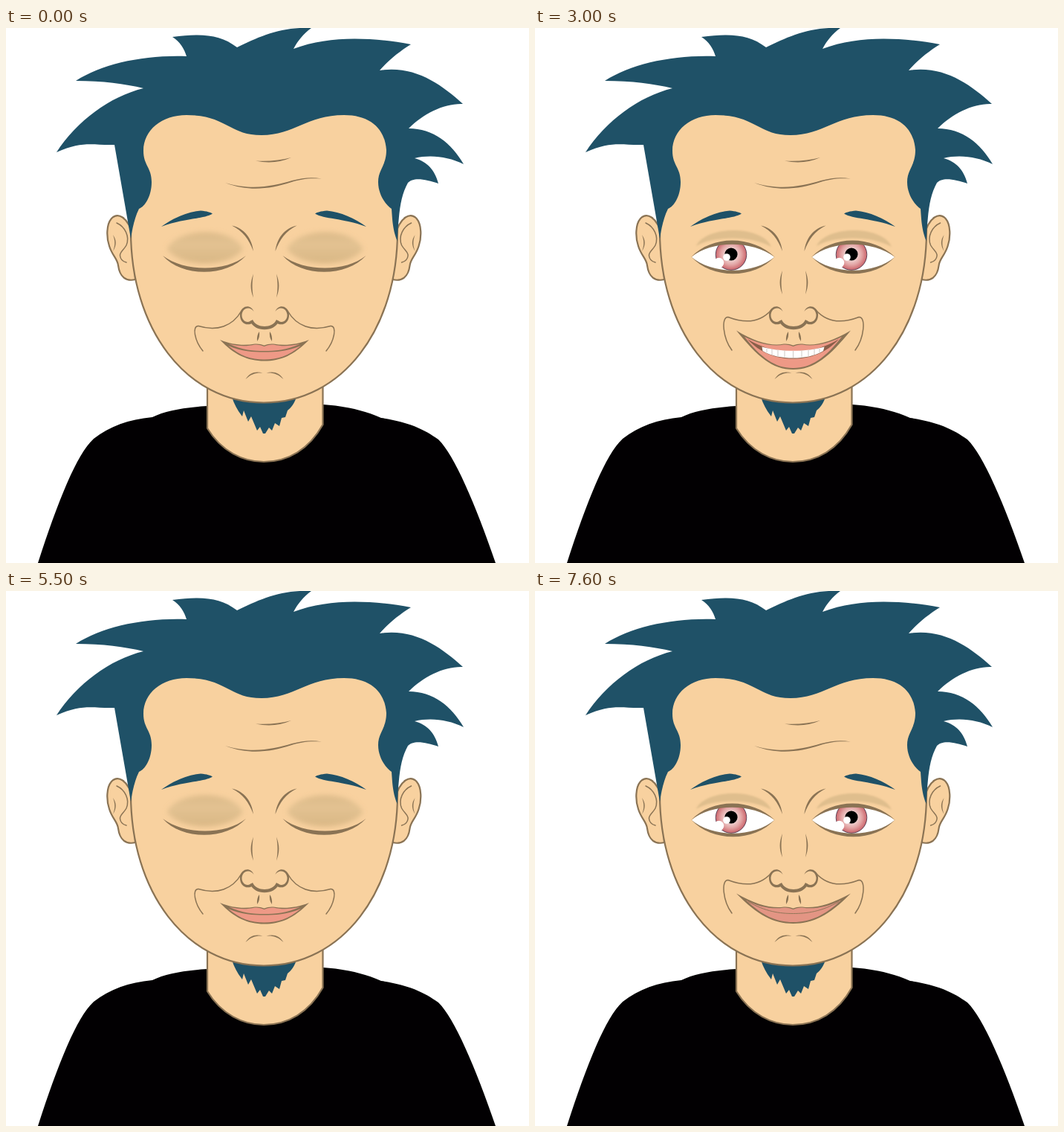
Animation of 704 by 719 pixels, one loop 8000 ms. Source, as an HTML page:

```html
<!DOCTYPE html>
<html lang="en">
<head>
<meta charset="utf-8">
<title>Blinking portrait</title>
<style>
  html, body { margin: 0; width: 100%; height: 100%; overflow: hidden; background: #fff; }
  svg { display: block; width: 100%; height: 100%; }
  .hair { fill: #1f5167; }
  .skin { fill: #f8d19f; stroke: #8a7354; stroke-width: 2.2; }
  .ink { fill: #8a7354; }
  .line { fill: none; stroke: #8a7354; stroke-width: 1.5; stroke-linecap: round; }
  .lip { fill: #ee9986; }

  /* every pose is held, then cut */
  .closed, .open, .gaze, .calm, .happy, .teeth, .smile, .level, .raised {
    animation: 8s step-end infinite;
  }
  .closed { animation-name: closed; }
  .open { animation-name: open; }
  .gaze { animation-name: gaze; }
  .calm { animation-name: calm; }
  .happy { animation-name: happy; }
  .teeth { animation-name: teeth; }
  .smile { animation-name: smile; }
  .level { animation-name: level; }
  .raised { animation-name: raised; }

  @keyframes closed { 0%, 68.75% { opacity: 1 } 37.5%, 70%, 100% { opacity: 0 } }
  @keyframes open { 0%, 68.75% { opacity: 0 } 37.5%, 70%, 100% { opacity: 1 } }
  @keyframes gaze { 0%, 95%, 100% { transform: none } 70% { transform: translate(20.8px, -4.2px) } }
  @keyframes calm { 0%, 68.75% { opacity: 1 } 12.5%, 95%, 100% { opacity: 0 } }
  @keyframes happy { 0%, 68.75% { opacity: 0 } 12.5%, 95%, 100% { opacity: 1 } }
  @keyframes teeth { 0%, 43.75%, 100% { opacity: 0 } 12.5% { opacity: 1 } }
  @keyframes smile { 0%, 68.75% { opacity: 0 } 43.75%, 95%, 100% { opacity: 1 } }
  @keyframes level { 0%, 95%, 100% { opacity: 1 } 70% { opacity: 0 } }
  @keyframes raised { 0%, 95%, 100% { opacity: 0 } 70% { opacity: 1 } }
</style>
</head>
<body>
<svg viewBox="0 0 704 719" preserveAspectRatio="none">
  <defs>
    <radialGradient id="irisFill">
      <stop offset=".3" stop-color="#f3dcda"/>
      <stop offset=".68" stop-color="#e2a3a3"/>
      <stop offset="1" stop-color="#cb646b"/>
    </radialGradient>
    <linearGradient id="lidFill" x2="0" y2="1">
      <stop offset="0" stop-color="#dcba89"/>
      <stop offset=".4" stop-color="#e3c292"/>
      <stop offset="1" stop-color="#d9b785"/>
    </linearGradient>
    <filter id="soft" x="-20%" y="-30%" width="140%" height="160%">
      <feGaussianBlur stdDeviation="3"/>
    </filter>
    <filter id="faint" x="-20%" y="-30%" width="140%" height="160%">
      <feGaussianBlur stdDeviation="1.2"/>
    </filter>
    <path id="lens" d="M211 308C238 282 292 282 322 308C295 334 238 334 211 308Z"/>
    <clipPath id="lensClip"><use href="#lens"/></clipPath>

    <g id="ear">
      <path class="skin" d="M171 280C164 252 150 248 142 256C135 264 135 281 139 293C143 306 150 310 151 319C153 335 162 341 174 338Z"/>
      <path class="line" d="M149 262C160 267 167 280 162 292C158 299 153 301 153.500 306C154 311 158 314 162 315"/>
      <path class="ink" d="M144 278C149 285 149 292 144 300C147 292 147 286 144 278Z"/>
    </g>

    <path id="brow" class="hair" d="M209 267C224 256 244 247 262 245.500C270 246 276 248 278 249.500C266 257 242 255 209 267Z"/>
    <path id="frown" class="ink" d="M304 265.500C321 269 331 283 333 300C327 284 319 273 304 265.500Z"/>
    <path id="bridge" class="ink" d="M333 326C328.500 338 328.500 346 333 358C331 346 331 338 333 326Z"/>

    <g id="lid">
      <path d="M217 297C230 268 304 266 319 297C302 322 236 324 217 297Z" fill="url(#lidFill)" filter="url(#soft)"/>
      <path class="ink" d="M211 306C236 335 297 335 323 306C296 328 240 328 211 306Z"/>
    </g>

    <g id="iris">
      <circle cx="264" cy="304.500" r="20.800" fill="url(#irisFill)" stroke="#5d4458"/>
      <circle cx="264" cy="304" r="8.600"/>
      <circle cx="258" cy="308" r="4.800" fill="#fff"/>
      <circle cx="247.500" cy="315.500" r="6.800" fill="#fff"/>
    </g>
    <g id="lashes">
      <path class="ink" d="M210 308C238 278 292 278 323 308C292 285 238 285 210 308Z"/>
      <path class="ink" d="M210 307C238 338 295 338 323 307C295 332 238 332 210 307Z"/>
    </g>
    <path id="shade" d="M217 293C230 265 306 265 318 294C290 279 242 279 217 293Z" fill="#dfbe8d" filter="url(#faint)"/>

    <g id="wing">
      <path class="ink" d="M333.500 381C330 371 317 372 315 384C314 396 324 402 333 396L330 393C324 398 317 393 317.500 385C319 375 329 374 333.500 381Z"/>
      <path class="ink" d="M341 408C338.500 411 337.500 416 338 421C341 417 341.500 413 341 408Z"/>
      <path class="ink" d="M322.500 472C328 463 336 461 345.500 463.500C336 463 330 465 322.500 472Z"/>
    </g>
    <path id="calmCheek" class="line" d="M317 380C305 401 284 408 259 400.500C250 400 254 421 265 434"/>
    <path id="happyCheek" class="line" d="M318 379C303 396 282 397 260 388.500C250 388 253 417 265 433"/>
  </defs>

  <!-- body -->
  <path fill="#020002" d="M43 719C70 636 95 573 118 552C140 535 165 526 197 523C215 514 240 510 271 508L427 506C455 508 480 513 505 524C540 529 563 539 582 553C603 573 632 640 659 719Z"/>
  <path class="skin" d="M271 470V538C290 569 319 583 347 583C380 583 408 566 426.500 533V470"/>
  <path class="hair" d="M304 496Q309 511 318 522L320 514L326 529L330 522L338 541L342 536L346 545H349L354 537L358 541L362 531L368 535L371 524L376 523L379 514Q387 508 391 496Z"/>

  <!-- head -->
  <use href="#ear"/>
  <use href="#ear" transform="matrix(-1 0 0 1 694.600 0)"/>
  <path class="skin" d="M168 270C167 405 243 503.500 347 503.500C452 503.500 528 405 527 270L520 90H175Z"/>
  <path class="hair" d="M168 283L146 157C117 158 104 151 68 167C95 125 140 92 185 81C160 75 130 71 94 71C130 48 185 36 243 38C240 28 234 18 224 12C262 7 288 8 311 26C340 12 370 -2 411 0C400 8 393 17 387 28C435 10 490 12 545 22C530 31 513 45 503 57C550 50 585 75 615 102C590 101 562 115 542 135C575 135 600 155 616 183C595 173 572 170 550 175C567 180 577 190 582 209C565 203 548 200 541 208C530 228 529 250 526.500 286C520 270 520 255 519 243C512 238 501 225 501 207C501 190 512 185 512 164C510 135 490 117 455 117C405 117 388 144 344 144C300 144 297 117 243 117C210 117 185 137 185 165C185 185 196 187 196 207C196 226 187 240 179 243C173 255 170 270 168 283Z"/>
  <path class="ink" d="M336 178.500Q362 180 384 174Q362 184 336 178.500Z"/>
  <path class="ink" d="M295 208C333 219 360 212 385 205C400 201 412 200 425 202.500C405 201.500 396 203.500 383 207.500C356 216 328 220.500 295 208Z"/>

  <!-- brows -->
  <use href="#brow"/>
  <use href="#frown"/>
  <g class="level">
    <use href="#brow" transform="matrix(-1 0 0 1 694 0)"/>
    <use href="#frown" transform="matrix(-1 0 0 1 695.500 0)"/>
  </g>
  <g class="raised">
    <path class="hair" d="M419.500 238.500C433 233 461 244 483.500 268.500C462 255 435 255 419.500 238.500Z"/>
    <path class="ink" d="M391 257.500C374 262 365 273 364 287C369 274 377 264 391 257.500Z"/>
  </g>

  <!-- eyes -->
  <g class="closed">
    <use href="#lid"/>
    <use href="#lid" x="161.500"/>
  </g>
  <g class="open">
    <g>
      <use href="#shade"/>
      <use href="#lens" fill="#fff"/>
      <g clip-path="url(#lensClip)"><g class="gaze"><use href="#iris"/></g></g>
      <use href="#lashes"/>
    </g>
    <g transform="translate(162 0)">
      <use href="#shade"/>
      <use href="#lens" fill="#fff"/>
      <g clip-path="url(#lensClip)"><g class="gaze"><use href="#iris"/></g></g>
      <use href="#lashes"/>
    </g>
  </g>

  <!-- nose and cheeks -->
  <g class="calm">
    <use href="#bridge" y="4.500"/>
    <use href="#bridge" y="4.500" transform="matrix(-1 0 0 1 697 0)"/>
    <use href="#calmCheek"/>
    <use href="#calmCheek" transform="matrix(-1 0 0 1 696 0)"/>
  </g>
  <g class="happy">
    <use href="#bridge"/>
    <use href="#bridge" transform="matrix(-1 0 0 1 697 0)"/>
    <use href="#happyCheek"/>
    <use href="#happyCheek" transform="matrix(-1 0 0 1 696 0)"/>
  </g>
  <use href="#wing"/>
  <use href="#wing" transform="matrix(-1 0 0 1 696 0)"/>
  <path class="ink" d="M329 394C334 409 362 409 367 394L364 392C359 404 337 404 332 392Z"/>

  <!-- mouths -->
  <g class="calm">
    <path class="ink" d="M288 419C305 426 320 427 335 424.500Q342 424 347.500 426.500Q353 424 360 424.500C375 427 390 426 408 419C387 440 370 447.500 347.500 447.500C325 447.500 307 439 288 419Z"/>
    <path class="lip" d="M300 424.500C314 428 324 428 335 425.500Q342 425 347.500 428Q353 425 360 425.500C371 428 381 428 396 424.500C378 433 362 434 347.500 434C333 434 318 433 300 424.500Z"/>
    <path class="lip" d="M299 427C318 435 333 435.500 347.500 435.500C362 435.500 377 435 397 427C380 441 366 445.500 347.500 445.500C329 445.500 316 441 299 427Z"/>
  </g>
  <g class="teeth">
    <path class="ink" d="M271 406.500C296 422 318 428 335 424.500Q342 424 347.500 426.500Q353 424 360 424.500C377 428 399 422 425 406.500C396 442 376 459 347.500 459C319 459 300 442 271 406.500Z"/>
    <path class="lip" d="M282 415C300 424 320 428.500 335 425.500Q342 425 347.500 428Q353 425 360 425.500C375 428.500 395 424 413 415C391 443 372 457 347.500 457C323 457 304 443 282 415Z"/>
    <path fill="#8a5f49" d="M286 418C310 433 330 434 347.500 434C365 434 385 433 409 418C392 437 370 444.500 347.500 444.500C325 444.500 303 437 286 418Z"/>
    <path fill="#fff" d="M305.500 428.500C330 435.500 365 435.500 389.500 428.500L388 434C376 441 362 443.500 347.500 443.500C333 443.500 318 441 306.500 434Z"/>
    <path fill="none" stroke="#b9b4ac" stroke-width=".7" d="M312 431V436M319 432V439M327 433V441M336 434V442.500M347.500 434V443M359 434V442.500M368 433V441M376 432V439M383 431V436"/>
  </g>
  <g class="smile">
    <path class="ink" d="M271 406.500C296 421 318 427 335 424.500Q342 424 347.500 426.500Q353 424 360 424.500C377 427 399 421 425 406.500C396 436 374 447 347.500 447C321 447 300 436 271 406.500Z"/>
    <path fill="#e39584" d="M284 415.500C302 425 320 428 335 425.500Q342 425 347.500 428Q353 425 360 425.500C375 428 393 425 412 415.500C390 436 371 445 347.500 445C324 445 306 436 284 415.500Z"/>
    <path class="line" style="stroke-width:.9" d="M287 417.500C310 431 330 433.500 347.500 433.500C365 433.500 386 431 409 417.500"/>
  </g>
</svg>
</body>
</html>
```
